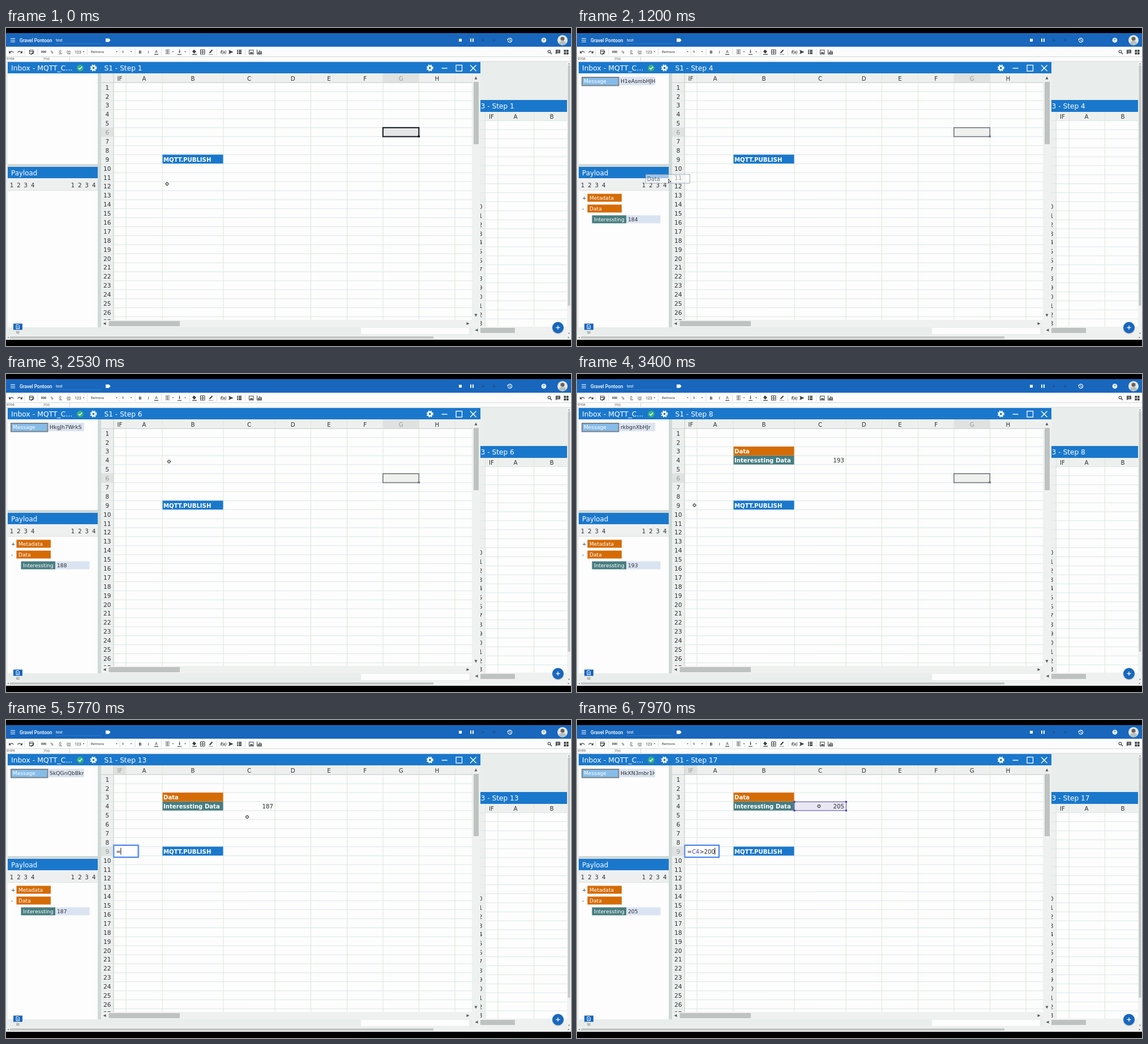
These frames come from a looping animation (998x561 px, 8 s). An HTML page with a canvas:

```html
<!DOCTYPE html>
<html lang="en">
<head>
<meta charset="utf-8">
<title>Spreadsheet stream</title>
<style>
  html, body { margin: 0; width: 100%; height: 100%; overflow: hidden; background: #000; }
  canvas { display: block; width: 998px; height: 561px; }
</style>
</head>
<body>
<canvas id="stage" width="998" height="561"></canvas>
<script>
const ctx = document.getElementById('stage').getContext('2d');
const LOOP = 8000;
const BLUE = '#1a78cc', BAR = '#1867bd', ORANGE = '#d56b05', TEAL = '#487d80';
const INK = '#2b2f33', PAPER = '#fcfdfc', HEAD = '#edf0ee';
const ROW_LINE = '#dce6e8', COL_LINE = '#dfe6d6';
const SANS = '"DejaVu Sans", sans-serif', UI = 'Roboto, sans-serif';

const COLS = [190, 212, 276, 384, 475, 538.5, 602.5, 666, 729.5, 793, 824];
const NAMES = ['IF', 'A', 'B', 'C', 'D', 'E', 'F', 'G', 'H'];
const ROW_H = 15.89;
const rowTop = r => 96.3 + (r - 1) * ROW_H;

const FEED = [null,
  ['Hy1esXbHkS', 186], ['rJgos7bB1r', 191], ['H1eAsmbHJH', 184], ['SyZ0jQWSyB', 189],
  ['HkgJh7WrkS', 188], ['B1xe3mZr1B', 185], ['rkbgnXbHJr', 193], ['SJgW27ZSyS', 187],
  ['BkxZ37ZB1S', 190], ['HyzM3QbrkH', 186], ['r1ef2mWHJB', 195], ['SkQGnQbBkr', 187],
  ['ByX7hXZH1S', 192], ['H1QX2mbBkE', 184], ['rJeV3QWrJr', 198], ['HkXN3mbr1H', 205]];
const stepAt = t => 1 + Math.floor((t + 385) / 500);

// time, x, y, constant speed
const PATH = [
  [0, 284.5, 275], [30, 284.5, 275], [370, 59, 321], [700, 59, 321],
  [1200, 162, 268, 1], [1850, 288, 154.5, 1], [2600, 288, 154.5], [3350, 207.5, 231.5],
  [4850, 207.5, 231.5], [5650, 426, 171], [5850, 426, 171], [6080, 427.5, 152]];
const GRAB = 700, DROP = 2300, FILLED = 2700, SELECT = 3450, PICK = 6150;
const TYPING = [[4300, '='], [PICK, '=C4'], [7050, '=C4>'], [7350, '=C4>2'], [7600, '=C4>20'], [7800, '=C4>200']];

function pointerAt(t) {
  const i = PATH.findIndex(p => p[0] > t);
  if (i < 0) return PATH[PATH.length - 1].slice(1, 3);
  const [t0, x0, y0] = PATH[i - 1], [t1, x1, y1, even] = PATH[i];
  let k = (t - t0) / (t1 - t0);
  if (!even) k = k * k * (3 - 2 * k);
  return [x0 + (x1 - x0) * k, y0 + (y1 - y0) * k];
}

function box(x, y, x2, y2, fill) {
  ctx.fillStyle = fill;
  ctx.fillRect(x, y, x2 - x, y2 - y);
}
function frame(x, y, x2, y2, color, width = 1) {
  ctx.strokeStyle = color;
  ctx.lineWidth = width;
  ctx.strokeRect(x, y, x2 - x, y2 - y);
}
function line(color, width, ...pts) {
  ctx.strokeStyle = color;
  ctx.lineWidth = width;
  ctx.beginPath();
  for (let i = 0; i < pts.length; i += 2) ctx.lineTo(pts[i], pts[i + 1]);
  ctx.stroke();
}
function poly(color, ...pts) {
  ctx.fillStyle = color;
  ctx.beginPath();
  for (let i = 0; i < pts.length; i += 2) ctx.lineTo(pts[i], pts[i + 1]);
  ctx.fill();
}
function disc(x, y, r, color) {
  ctx.fillStyle = color;
  ctx.beginPath();
  ctx.arc(x, y, r, 0, 7);
  ctx.fill();
}
function arc(x, y, r, from, to, color, width) {
  ctx.strokeStyle = color;
  ctx.lineWidth = width;
  ctx.beginPath();
  ctx.arc(x, y, r, from, to);
  ctx.stroke();
}
function text(s, x, y, size, color = INK, align = 'left', weight = '', family = SANS) {
  ctx.font = `${weight} ${size}px ${family}`;
  ctx.textAlign = align;
  ctx.textBaseline = 'alphabetic';
  ctx.fillStyle = color;
  ctx.fillText(s, x, y + size * .365 + .3);
}
function clipped(x, y, x2, y2, draw) {
  ctx.save();
  ctx.beginPath();
  ctx.rect(x, y, x2 - x, y2 - y);
  ctx.clip();
  draw();
  ctx.restore();
}
function arrow(x, y, dx, dy, size, color) {
  poly(color, x + dx * size, y + dy * size, x - dx * size + dy * size, y - dy * size + dx * size,
    x - dx * size - dy * size, y - dy * size - dx * size);
}
function gear(x, y) {
  ctx.setLineDash([2.1, 1.9]);
  arc(x, y, 5, 0, 6.283, '#fff', 2);
  ctx.setLineDash([]);
  arc(x, y, 3.2, 0, 6.283, '#fff', 2.6);
}

function drawTopBar() {
  box(0, 9, 998, 33, BAR);
  for (const y of [18.5, 21.5, 24.5]) line('#fff', 1, 8, y, 16, y);
  text('Gravel Pontoon', 24, 21.3, 8.4, '#fff', 'left', '500', UI);
  text('test', 88, 21.6, 7, '#fff', 'left', '', UI);
  line('#2f77c4', 1, 87, 27.5, 169, 27.5);
  poly('#fff', 176, 18.5, 182, 18.5, 184.5, 21.5, 182, 24.5, 176, 24.5);
  box(800, 19, 805, 24, '#fff');
  box(820, 18.5, 822, 24.5, '#fff');
  box(824, 18.5, 826, 24.5, '#fff');
  arrow(843, 21.5, 1, 0, 2.5, '#21528c');
  arrow(863, 21.5, 1, 0, 2.5, '#21528c');
  arc(890, 21.5, 3.6, -2.6, 2.8, '#fff', 1.2);
  arrow(886.5, 21, 0, 1, 1.5, '#fff');
  line('#fff', 1, 890, 19.3, 890, 22, 892, 23);
  disc(950, 21.5, 4.3, '#fff');
  text('?', 950, 21.5, 7, BAR, 'center', 'bold', UI);
  disc(983, 21.5, 9, '#e4eaec');
  ctx.save();
  ctx.beginPath();
  ctx.arc(983, 21.5, 9, 0, 7);
  ctx.clip();
  disc(983, 19, 3.6, '#6d6259');
  disc(983, 30, 7.5, '#b9bfbf');
  ctx.restore();
}

function drawToolbar(cellName) {
  const ink = '#3b3f42', tag = (s, x, size, weight = '') => text(s, x, 41.8, size, ink, 'center', weight, UI);
  box(0, 33, 998, 60, '#fbfcfb');
  line('#d6dada', 1, 0, 50.5, 998, 50.5);
  box(0, 58, 998, 60, '#e3e7e6');
  for (const x of [33, 56, 143.5, 201, 228, 274.5, 324.5, 372.5, 422.5]) line('#dfe3e2', 1, x, 36, x, 48);
  for (const [x, d] of [[10, 1], [24, -1]]) {
    arc(x, 44.5, 3.4, Math.PI * 1.08, Math.PI * 1.92, ink, 1.1);
    poly(ink, x - 4.8 * d, 40, x - 4.8 * d, 44.5, x - 1 * d, 44.5);
  }
  frame(41.5, 39, 48, 45.5, ink);
  line(ink, 1, 41, 41.5, 49, 41.5);
  line(ink, 1.2, 44, 47, 49.5, 41.5);
  tag('000', 66.5, 5.6, 'bold');
  tag('%', 81, 7);
  tag('.0', 95, 6.5);
  line(ink, .8, 94, 45.5, 99, 45.5);
  tag('.00', 110, 6.2);
  line(ink, .8, 108, 45.5, 114, 45.5);
  tag('123', 127, 6.7);
  text('Belmora', 150, 41.3, 6.2, ink, 'left', '', UI);
  tag('9', 206.5, 6.2);
  for (const x of [137, 195.5, 221, 295, 316.5]) arrow(x, 42, 0, 1, 1.1, ink);
  tag('B', 237, 7.6, 'bold');
  tag('I', 251.5, 7.6, 'italic');
  text('A', 265.5, 41, 7.4, ink, 'center', '', UI);
  line(ink, 1.2, 262, 46.5, 269, 46.5);
  for (let i = 0; i < 4; i++) line('#777', 1, 281.5, 38.5 + i * 2.3, 289, 38.5 + i * 2.3);
  line('#777', 1, 285, 38, 285, 46);
  line(ink, 1, 306.5, 38, 306.5, 44);
  arrow(306.5, 43, 0, 1, 1.4, ink);
  line(ink, 1, 303, 46.5, 310, 46.5);
  poly(ink, 332, 38, 336, 41.5, 332.5, 45, 329, 41.5);
  line(ink, 1.2, 329, 46.5, 337, 46.5);
  frame(343.5, 38.5, 351, 46, ink);
  line(ink, 1, 347.3, 38.5, 347.3, 46);
  line(ink, 1, 343.5, 42.3, 351, 42.3);
  line(ink, 2, 359.5, 44, 364.5, 38.7);
  line('#999', 1, 358, 46.5, 366, 46.5);
  tag('f(x)', 384, 7, 'italic bold');
  poly(ink, 393, 38.5, 401.5, 42.2, 393, 46, 394.5, 42.2);
  for (const y of [39.5, 42.3, 45]) {
    box(408, y - 1, 410, y + 1, ink);
    box(411, y - 1, 416, y + 1, ink);
  }
  frame(429.5, 39, 437, 46, ink);
  poly(ink, 430.5, 45, 432.5, 42, 434, 43.5, 435, 42.5, 436.5, 45);
  line(ink, 1, 443.5, 38, 443.5, 46, 452, 46);
  for (const [x, y] of [[445, 42], [447.5, 39.5], [450, 41]]) box(x, y, x + 1.6, 46, ink);
  arc(959.5, 41.5, 2.3, 0, 6.283, ink, 1.1);
  line(ink, 1.3, 961.3, 43.3, 964, 46);
  poly(ink, 971, 38.5, 979, 38.5, 979, 44.5, 973, 44.5, 971, 46.5);
  line('#fff', .7, 972.5, 40.5, 977.5, 40.5);
  line('#fff', .7, 972.5, 42.5, 977.5, 42.5);
  for (const x of [985.5, 990]) for (const y of [38.5, 43]) box(x, y, x + 3.6, y + 3.6, ink);
  text(cellName, 1, 54, 5.2, '#444', 'left', '', UI);
  text('F(x)', 68, 54, 5.2, '#444', 'left', '', UI);
  line('#cfd4d3', 1, 66.5, 51, 66.5, 58);
  line('#cfd4d3', 1, 112.5, 51, 112.5, 58);
}

function drawInbox(entry) {
  box(3, 80, 162, 240, PAPER);
  box(3, 240, 162, 245, '#d0d9d7');
  box(3, 245, 162, 265, BLUE);
  box(3, 265, 162, 286, HEAD);
  box(3, 286, 162, 528, PAPER);
  line('#dde2e0', 1, 3, 286.5, 162, 286.5);
  text('Payload', 9, 255.3, 11.9, '#fff');
  for (const left of [10, 118]) for (let i = 0; i < 4; i++) text(i + 1, left + i * 12.4, 276.5, 10.2, INK, 'center');
  if (!entry) return;
  const [id, value] = entry;
  box(75, 86, 138, 101, '#dce4f0');
  clipped(75, 86, 138, 101, () => text(id, 77, 93.7, 9.3));
  box(8, 86, 74, 102, '#86bce9');
  frame(9, 87, 73.5, 101.5, '#7b8388', 2);
  text('Message', 12, 93.7, 9.1, '#fff');
  text('+', 9, 299.3, 9.2);
  text('-', 9, 318.3, 9.2);
  for (const [label, y] of [['Metadata', 292.5], ['Data', 311.5]]) {
    box(18.5, y, 79, y + 14, ORANGE);
    text(label, 22, y + 6.8, 9.1, '#fff');
  }
  box(26.5, 330.5, 87, 344.5, TEAL);
  text('Interessting', 30, 337.3, 9.1, '#fff');
  box(87, 330.5, 147.5, 344.5, '#dae3f1');
  text(value, 90, 337.3, 9.2);
}

function drawSheet(t, entry) {
  const moved = t >= SELECT, col = moved ? 0 : 7, row = moved ? 9 : 6;
  box(168, 80, 824, 515, PAPER);
  box(168, 80, 824, 96.3, HEAD);
  box(168, 96, 190, 515, HEAD);
  box(COLS[col], 80, COLS[col + 1], 96.3, '#dfe2e0');
  box(168, rowTop(row), 190, rowTop(row + 1), '#dfe2e0');
  clipped(168, 80, 824, 515, () => {
    for (const x of COLS) line(COL_LINE, 1, x, 80, x, 515);
    for (let r = 1; r <= 27; r++) {
      line(ROW_LINE, 1, 168, rowTop(r), 824, rowTop(r));
      text(r, 178.8, rowTop(r) + 8.2, 10.6, r === row ? '#94999a' : INK, 'center');
    }
    line('#c9d0ce', 1, 168, 96.3, 824, 96.3);
    line('#c9d0ce', 1, 190, 80, 190, 515);
  });
  NAMES.forEach((name, i) => text(name, (COLS[i] + COLS[i + 1]) / 2, 88.6, 10.3, i === col ? '#94999a' : INK, 'center'));

  const label = (s, r, fill) => {
    box(276.5, rowTop(r), 383.5, rowTop(r + 1) - .2, fill);
    text(s, 278, rowTop(r) + 8.4, 10.15, '#fff', 'left', 'bold');
  };
  label('MQTT.PUBLISH', 9, BLUE);
  if (t >= FILLED) {
    label('Data', 3, ORANGE);
    label('Interessting Data', 4, TEAL);
    if (t >= PICK) {
      box(384, 144.5, 475.5, 159.8, '#e9e7f3');
      frame(384, 144.3, 475.5, 159.8, '#5a49b4', 1);
      for (const x of [384, 475.5]) for (const y of [144.3, 159.8]) box(x - 1.5, y - 1.5, x + 1.5, y + 1.5, '#4a36a8');
    }
    text(entry[1], 472, rowTop(4) + 8.4, 10.2, INK, 'right');
  }
  if (!moved) {
    const color = t < GRAB ? '#111622' : '#72767c';
    box(666, 176, 729.5, 192, t < GRAB ? '#e4e7e5' : '#eff1ef');
    frame(665.8, 175.8, 729.3, 191.6, color, t < GRAB ? 2 : 1.6);
    box(727.5, 189.5, 731, 193, color);
  } else if (t < TYPING[0][0]) {
    frame(190, 223.5, 212, 239.3, '#111622', 2);
    box(210, 237.5, 213.5, 241, '#111622');
  } else drawEditor(t);
}

function drawEditor(t) {
  const [since, formula] = TYPING.filter(k => k[0] <= t).pop();
  ctx.font = `10px ${SANS}`;
  const measure = s => ctx.measureText(s).width;
  const left = 194.5, end = left + measure(formula);
  const right = Math.max(233.5, end + 7);
  ctx.save();
  ctx.shadowColor = 'rgba(60,110,220,.5)';
  ctx.shadowBlur = 2;
  box(189.5, 220, right + 1, 243, '#4a86ee');
  ctx.restore();
  box(191.3, 222, right - 1, 241, '#fff');
  const y = 231.6;
  text('=', left, y, 10);
  text(formula.slice(1, 3), left + measure('='), y, 10, '#5140c4');
  text(formula.slice(3), left + measure(formula.slice(0, 3)), y, 10);
  if ((t - since) % 1000 < 500) line('#111', 1, end, 225.5, end, 237.5);
}

function drawMainWindow(step) {
  box(3, 60, 838, 80, BLUE);
  text('Inbox - MQTT_C...', 9, 70.4, 12.4, '#fff');
  disc(131, 70.5, 5.8, '#35b57c');
  line('#fff', 1.4, 128, 70.5, 130.2, 72.8, 134.2, 68.3);
  gear(154.5, 70.5);
  text(`S1 - Step ${step}`, 173.5, 70.4, 12.2, '#fff');
  gear(748.8, 70.5);
  line('#fff', 1.4, 769.5, 71, 779.5, 71);
  frame(795, 65.5, 805.5, 76, '#fff', 1.3);
  line('#fff', 1.4, 820, 65.5, 830.5, 76);
  line('#fff', 1.4, 830.5, 65.5, 820, 76);
  box(162, 80, 168, 528, '#cfd9d7');
  box(824, 80, 838, 528, '#eef1ef');
  box(826, 95, 835, 205, '#bec2c1');
  arrow(830, 88, 0, -1, 2.5, '#555a5c');
  arrow(830, 507, 0, 1, 2.5, '#555a5c');
  box(168, 515, 838, 528, '#eef1ef');
  box(181.5, 517, 307, 526, '#bec2c1');
  arrow(174, 521.5, -1, 0, 2.5, '#555a5c');
  arrow(816, 521.5, 1, 0, 2.5, '#555a5c');
}

function drawRightWindow(step) {
  clipped(838, 127, 991, 541, () => {
    box(838, 127, 991, 541, PAPER);
    box(838, 127, 991, 148, BLUE);
    text(`3 - Step ${step}`, 838.5, 137.7, 12.2, '#fff');
    box(838, 148, 991, 163.5, HEAD);
    box(838, 163, 846.5, 527, HEAD);
    for (const x of [846.5, 869, 932.5]) line(COL_LINE, 1, x, 148, x, 527);
    for (let r = 1; r <= 23; r++) {
      const y = 163.5 + (r - 1) * ROW_H;
      line(ROW_LINE, 1, 838, y, 991, y);
      if (r > 9) text(r, 841.5, y + 8.2, 10.6, INK, 'right');
    }
    [['IF', 857.5], ['A', 900], ['B', 964]].forEach(([s, x]) => text(s, x, 156, 10.3, INK, 'center'));
    box(838, 527, 991, 541, '#eef1ef');
    box(838, 529, 899, 538, '#bec2c1');
  });
}

function drawFooter() {
  box(627, 529, 818, 540, PAPER);
  box(824, 528, 838, 541, '#eef1ef');
  arrow(831, 533, -1, 0, 2.5, '#555a5c');
  box(0, 542, 998, 550, '#f0f2f1');
  box(7, 544, 755, 548, '#c2c7c5');
  arrow(3.5, 546, -1, 0, 1.3, '#666');
  arrow(994, 546, 1, 0, 1.3, '#666');
  box(991, 60, 998, 542, '#f0f2f1');
  box(992.5, 66, 996.5, 490, '#c2c7c5');
  arrow(994.5, 63, 0, -1, 1.3, '#666');
  arrow(994.5, 539, 0, 1, 1.3, '#666');
  box(13, 521.5, 29, 532.5, BAR);
  line('#fff', 1, 22, 523.5, 18, 523.5, 18, 530.5, 23.5, 530.5, 23.5, 525, 22, 523.5);
  line('#fff', .8, 19.5, 526.5, 22, 526.5);
  line('#fff', .8, 19.5, 528.5, 22, 528.5);
  text('S2', 21, 536.7, 5, '#444', 'center', '', UI);
  disc(975, 529.5, 10.5, 'rgba(0,0,0,.18)');
  disc(975, 528.5, 10, BAR);
  line('#fff', 1.3, 971.5, 528.5, 978.5, 528.5);
  line('#fff', 1.3, 975, 525, 975, 532);
}

function drawPointer(t) {
  const [x, y] = pointerAt(t);
  const dragging = t >= GRAB && t < DROP;
  if (dragging) {
    box(x - 41, y - 9.5, x + 37, y + 6, 'rgba(255,255,255,.58)');
    frame(x - 41, y - 9.5, x + 37, y + 6, 'rgba(120,130,150,.65)');
    text('Data', x - 38.5, y - 2, 9.6, 'rgba(50,70,95,.75)');
  }
  if (dragging || x < 168) {
    poly('#222', x - 1, y - 2, x - 1, y + 6, x + 1, y + 4.2, x + 4.5, y + 4);
    poly('#fff', x - .3, y - .3, x - .3, y + 4.3, x + .7, y + 3.4, x + 2.8, y + 3.2);
    return;
  }
  for (const [r, w, color] of [[3, 2.8, '#222'], [2.2, 1.2, '#fff']]) {
    line(color, w, x - r, y, x + r, y);
    line(color, w, x, y - r, x, y + r);
  }
}

function draw(t) {
  const step = stepAt(t), entry = FEED[step - 1];
  box(0, 0, 998, 561, '#000');
  box(0, 60, 998, 550, '#e9edeb');
  drawTopBar();
  drawToolbar(t >= SELECT ? 'S1!IF9' : 'S1!G6');
  drawRightWindow(step);
  drawMainWindow(step);
  drawInbox(entry);
  drawSheet(t, entry);
  drawFooter();
  drawPointer(t);
}

const start = performance.now();
function tick() {
  draw((performance.now() - start) % LOOP);
  requestAnimationFrame(tick);
}
tick();
</script>
</body>
</html>
```
